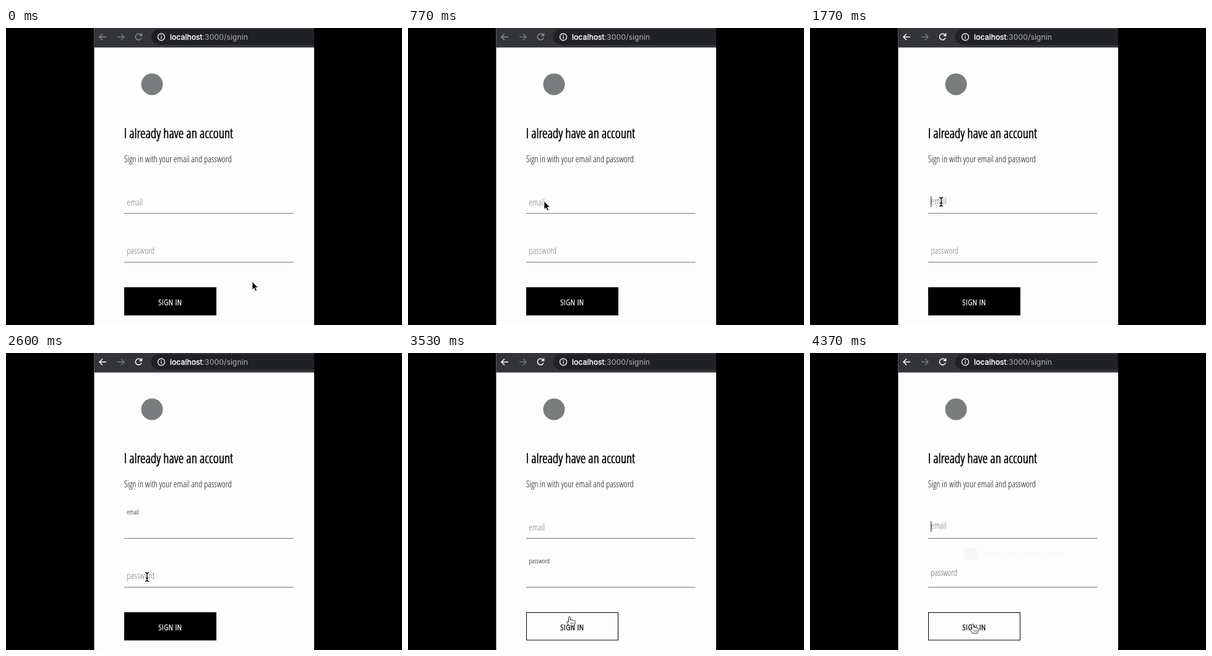
These frames come from a looping animation (640 px wide and 480 px high, 4410 ms). An HTML page:

```html
<!DOCTYPE html>
<html lang="en">
<head>
<meta charset="utf-8">
<title>Sign in</title>
<style>
  html, body { margin: 0; width: 100%; height: 100%; overflow: hidden; background: #000; }
  svg { display: block; width: 100vw; height: 100vh; font-weight: 300; }
  text { white-space: pre; }
  .url { font: 12.3px Inter, sans-serif; }
  .icon { fill: none; stroke-width: 1.5; }
</style>
</head>
<body>
<svg id="stage" viewBox="0 0 640 480">
  <rect width="640" height="480"/>
  <rect x="142.5" width="355.5" height="480" fill="#fdfdfd"/>

  <g id="toolbar">
    <rect x="142.5" width="355.5" height="31.500" fill="#333438"/>
    <path d="M498 2H247a12.5 12.5 0 0 0 0 25H498Z" fill="#202124"/>
    <path id="back" class="icon" d="M162 14.500H151M156 9.500l-5 5 5 5"/>
    <path class="icon" d="M180 14.500h11M186 9.500l5 5-5 5" stroke="#77787a"/>
    <path id="reload" class="icon" d="M218.500 11.500A5 5 0 1 0 219 16M219.500 8.500V12.500H215.500"/>
    <circle cx="251" cy="14.500" r="5.500" fill="none" stroke="#f0f0f0" stroke-width="1.400"/>
    <path d="M251 13.500V17.500M251 11V12.400" stroke="#f0f0f0" stroke-width="1.400"/>
    <text class="url" x="265" y="18.800" fill="#aeb0b2"><tspan fill="#fff" stroke="#fff" stroke-width=".35">localhost</tspan>:3000/signin</text>
  </g>

  <circle cx="236" cy="91" r="17.500" fill="#7a7d7d"/>

  <text id="title" font-size="21.700" stroke="#000" stroke-width=".7">I already have an account</text>
  <text id="subtitle" font-size="14.450" fill="#111">Sign in with your email and password</text>

  <path d="M191 299.500H464.500M191 378.500H464.500" stroke="#777"/>
  <text id="email">email</text>
  <text id="password">password</text>
  <path id="caret" stroke="#222"/>

  <rect id="button" x="191.500" y="419.500" width="148" height="44.500" stroke="#000"/>
  <text id="action" font-size="13.550" letter-spacing=".45" text-anchor="middle" stroke-width=".45">SIGN IN</text>

  <g id="tooltip" fill="#ccc">
    <rect x="250" y="315" width="20" height="20" rx="3"/>
    <text class="url" x="279" y="329">Please fill out this field.</text>
  </g>

  <g id="cursors" stroke-linejoin="round">
    <path id="arrow" d="M0 0V13.200L3 10.400 5.200 15.200 7.500 14.200 5.300 9.600H9.300Z" fill="#000" stroke="#fff" stroke-width=".8"/>
    <g id="beam" fill="none">
      <path d="M-3-7Q0-7 0-4.500Q0-7 3-7M0-5V5M-3 7Q0 7 0 4.500Q0 7 3 7M-2 2H2" stroke="#fff" stroke-width="2.800"/>
      <path d="M-3-7Q0-7 0-4.500Q0-7 3-7M0-5V5M-3 7Q0 7 0 4.500Q0 7 3 7M-2 2H2" stroke="#111" stroke-width="1.400"/>
    </g>
    <g id="hand" stroke="#222">
      <path d="M-1.500 9V1Q0-1.500 1.500 1V5.500Q3 4 4 6Q5.500 5 6.500 6.500Q8.500 6 9 8V11L7.500 15H0L-4.500 9.500Q-4.500 7-1.500 9Z" fill="#fff"/>
      <path d="M2 9.500V12.500M4 9.500V12.500M6 9.500V12.500" stroke-width=".7"/>
    </g>
  </g>
</svg>
<script>
const LOOP = 4410;
const ACTIVATE = 1700, EMAIL_FOCUS = 1750, PASSWORD_FOCUS = 2840, PASSWORD_BLUR = 4225, INVALID = 4340;
const REST_SIZE = 14.45, SMALL_SIZE = 10.84;
const CONDENSED = .732;

const el = Object.fromEntries([...document.querySelectorAll('[id]')].map(n => [n.id, n]));
const set = (node, attrs) => Object.entries(attrs).forEach(([k, v]) => node.setAttribute(k, v));
const clamp = v => Math.min(1, Math.max(0, v));
const mix = (a, b, p) => a + (b - a) * p;
const smooth = p => p * p * (3 - 2 * p);

// CSS "ease": cubic-bezier(.25, .1, .25, 1)
function ease(x) {
  if (x <= 0 || x >= 1) return clamp(x);
  const bezier = (a, b, u) => 3 * a * u * (1 - u) ** 2 + 3 * b * u * u * (1 - u) + u ** 3;
  let lo = 0, hi = 1;
  for (let i = 0; i < 20; i++) {
    const mid = (lo + hi) / 2;
    if (bezier(.25, .25, mid) < x) lo = mid; else hi = mid;
  }
  return bezier(.1, 1, lo);
}
const transition = (t, start) => ease((t - start) / 300);

function useFont(family, stretch) {
  el.stage.style.fontFamily = `${family}, sans-serif`;
  el.stage.style.fontStretch = stretch;
  return el.subtitle.getComputedTextLength();
}

// Use a true condensed light face if installed, otherwise narrow the regular light one.
function chooseFont() {
  const regular = useFont('"Open Sans"', 'normal');
  const isLight = width => Math.abs(width / regular - CONDENSED) < .06;
  if (isLight(useFont('"Open Sans Condensed Light"', 'normal'))) return 1;
  if (isLight(useFont('"Open Sans"', '75%'))) return 1;
  useFont('"Open Sans"', 'normal');
  return CONDENSED;
}
const narrow = chooseFont();
const place = (node, x, y) => node.setAttribute('transform', `translate(${x} ${y}) scale(${narrow} 1)`);

// time, x, y of the pointer's hot spot
const route = [
  [30, 398, 410], [650, 220, 280], [1150, 220, 280], [1600, 212, 281], [2130, 212, 281],
  [2520, 228, 362], [3330, 228, 362], [3530, 261, 426], [3760, 263, 438]
];
function pointer(t) {
  const i = route.findIndex(stop => stop[0] > t);
  if (i === 0) return route[0].slice(1);
  if (i < 0) return route.at(-1).slice(1);
  const [t0, x0, y0] = route[i - 1], [t1, x1, y1] = route[i];
  const p = smooth((t - t0) / (t1 - t0));
  return [mix(x0, x1, p), mix(y0, y1, p)];
}

function drawLabel(node, restY, smallY, lift) {
  const tone = Math.round(mix(128, 10, lift));
  set(node, { 'font-size': mix(REST_SIZE, SMALL_SIZE, lift), fill: `rgb(${tone},${tone},${tone})` });
  place(node, 195.3, mix(restY, smallY, lift));
}

function drawCaret(t) {
  const [start, y] = t >= INVALID ? [INVALID, 272]
    : t >= PASSWORD_FOCUS ? [PASSWORD_FOCUS, 351] : [EMAIL_FOCUS, 272];
  const focused = t >= EMAIL_FOCUS && (t < PASSWORD_BLUR || t >= INVALID);
  const on = focused && Math.floor((t - start) / 500) % 2 === 0;
  set(el.caret, { d: `M195.700 ${y}v17`, visibility: on ? 'visible' : 'hidden' });
}

function drawPointer(t) {
  const [x, y] = pointer(t);
  const overButton = x > 191 && x < 340 && y > 420 && y < 464;
  const overInput = (y > 270 && y < 300) || (y > 348 && y < 379);
  const shape = overButton ? el.hand : t >= ACTIVATE && overInput ? el.beam : el.arrow;
  for (const cursor of [el.arrow, el.beam, el.hand])
    cursor.setAttribute('visibility', cursor === shape ? 'visible' : 'hidden');
  el.cursors.setAttribute('transform', `translate(${x} ${y})`);
  const ink = overButton ? '#000' : '#fff';
  set(el.button, { fill: overButton ? '#fdfdfd' : '#000' });
  set(el.action, { fill: ink, stroke: ink });
}

function draw(t) {
  const navColor = t < ACTIVATE ? '#8c8d90' : '#fff';
  for (const icon of [el.back, el.reload]) icon.setAttribute('stroke', navColor);

  const emailLift = t < PASSWORD_FOCUS ? transition(t, EMAIL_FOCUS)
    : t < INVALID ? 1 - transition(t, PASSWORD_FOCUS) : transition(t, INVALID);
  const passwordLift = t < PASSWORD_BLUR ? transition(t, PASSWORD_FOCUS) : 1 - transition(t, PASSWORD_BLUR);
  drawLabel(el.email, 286.8, 261.3, emailLift);
  drawLabel(el.password, 365.3, 340, passwordLift);
  drawCaret(t);
  el.tooltip.setAttribute('opacity', .1 * clamp((t - INVALID) / 30));
  drawPointer(t);
}

place(el.title, 190.7, 177.5);
place(el.subtitle, 190.7, 217);
place(el.action, 265.3, 447.8);

function tick() {
  draw(performance.now() % LOOP);
  requestAnimationFrame(tick);
}
tick();
</script>
</body>
</html>
```
